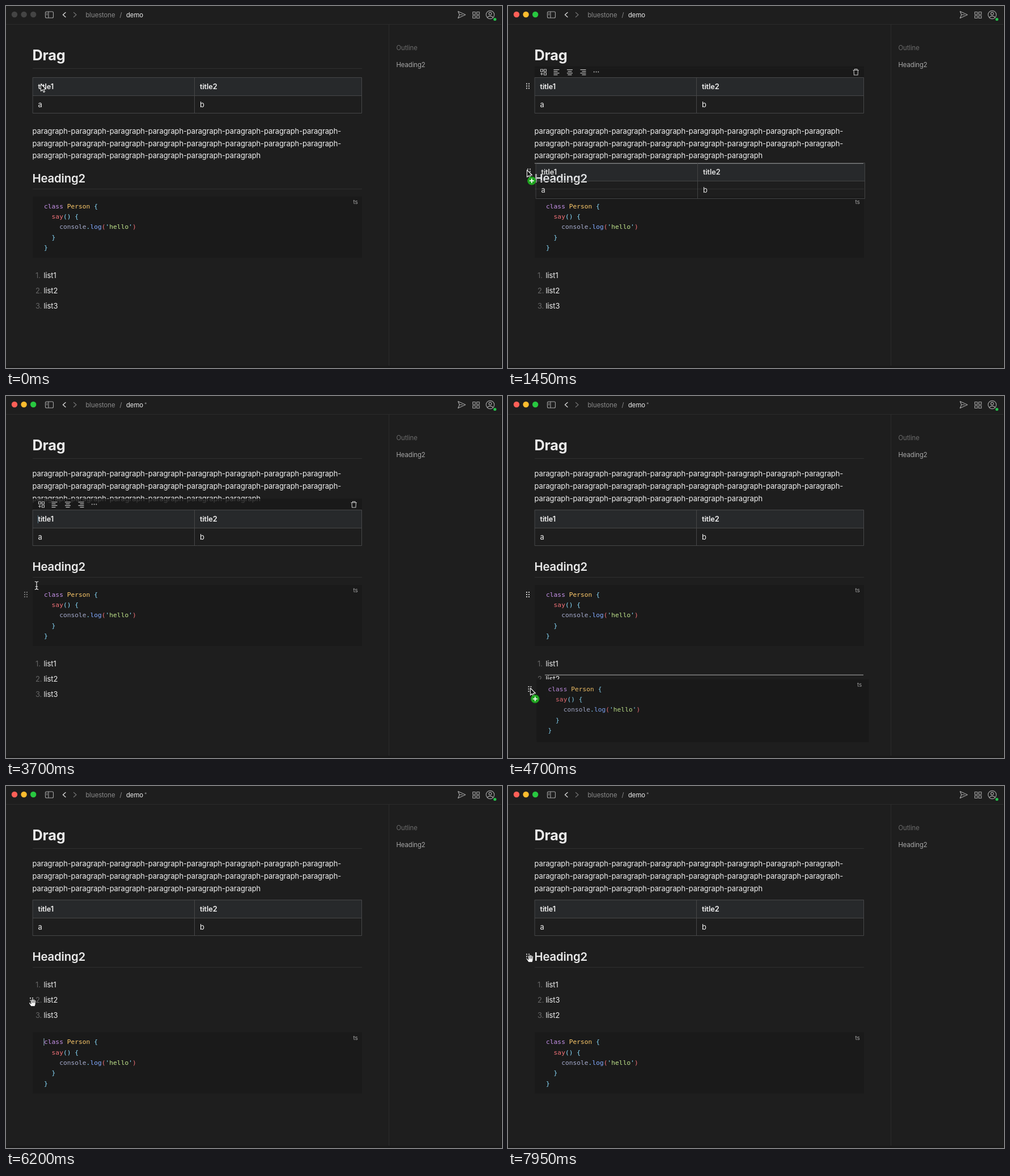
Write an HTML page with a canvas that moves like this. It is 875 px wide and 640 px high and loops after 8000 ms.

```html
<!DOCTYPE html>
<html lang="en">
<head>
<meta charset="utf-8">
<title>Drag demo</title>
<style>
html, body { margin: 0; width: 100%; height: 100%; overflow: hidden; background: #1e1e1e; }
canvas { display: block; width: 875px; height: 640px; }
</style>
</head>
<body>
<canvas id="stage"></canvas>
<script>
const W = 875, H = 640, LOOP = 8000;
const SANS = 'Inter, "Open Sans", sans-serif';
const MONO = '"DejaVu Sans Mono", monospace';
const INK = '#f0f0f0', EDGE = '#464748';
const LEFT = 47, RIGHT = 628;
const DROP1 = 2000, DROP2 = 5200, DROP3 = 6900;

const canvas = document.getElementById('stage');
const ctx = canvas.getContext('2d');
const dpr = window.devicePixelRatio || 1;
canvas.width = W * dpr;
canvas.height = H * dpr;

// time, x, y of the pointer
const track = [
  [0, 61.5, 138], [450, 61.5, 138], [900, 31.5, 139], [1050, 31.5, 139],
  [1450, 33.5, 290], [1980, 33.5, 290], [2250, 41, 183], [2600, 41, 183],
  [3300, 60, 262], [3700, 54, 335], [4100, 36, 349.5], [4300, 36, 349.5],
  [4700, 39.5, 516.5], [5050, 40, 546], [5350, 40, 546], [6100, 47, 383],
  [6250, 47, 383], [6750, 48, 411], [7050, 48, 411], [7800, 39, 305], [8000, 39, 305]
];

// start time, pointer shape
const shapes = [
  [0, 'arrow'], [800, 'hand'], [1050, 'drag'], [DROP1, 'arrow'], [2700, 'beam'],
  [3950, 'hand'], [4300, 'drag'], [DROP2, 'arrow'], [6000, 'hand'], [6250, 'drag'],
  [DROP3, 'arrow'], [7650, 'hand']
];

// from, to, x, y, colour
const handles = [
  [500, 800, 35, 141.5, '#777'], [800, DROP1, 35, 141.5, '#ccc'],
  [3600, 3950, 35, 351, '#777'], [3950, DROP2, 35, 351, '#ccc'],
  [6000, DROP3, 45, 379, '#ccc'], [7600, LOOP, 35, 301.5, '#ccc']
];

// from, to, left, y
const dropLines = [
  [1150, DROP1, LEFT, 278], [4450, 4600, LEFT, 446],
  [4600, 4850, 65, 493], [4850, DROP2, LEFT, 541], [6450, DROP3, 65, 418]
];

const during = (t, a, b) => t >= a && t < b;

function pointerAt(t) {
  let i = 1;
  while (i < track.length - 1 && t > track[i][0]) i++;
  const [t0, x0, y0] = track[i - 1], [t1, x1, y1] = track[i];
  const u = (t - t0) / (t1 - t0), e = u * u * (3 - 2 * u);
  return [x0 + (x1 - x0) * e, y0 + (y1 - y0) * e];
}

function text(str, x, y, size, color, weight = 400, family = SANS) {
  ctx.font = `${weight} ${size}px ${family}`;
  ctx.letterSpacing = family === SANS ? `${-0.01 * size}px` : '0px';
  ctx.fillStyle = color;
  ctx.fillText(str, x, y);
}

function rect(x, y, w, h, color) {
  ctx.fillStyle = color;
  ctx.fillRect(x, y, w, h);
}

function dot(x, y, r, color) {
  ctx.fillStyle = color;
  ctx.beginPath();
  ctx.arc(x, y, r, 0, 7);
  ctx.fill();
}

function stroke(d, color, width = 1.2) {
  ctx.strokeStyle = color;
  ctx.lineWidth = width;
  ctx.lineCap = ctx.lineJoin = 'round';
  ctx.stroke(new Path2D(d));
}

function at(x, y, fn) {
  ctx.save();
  ctx.translate(x, y);
  fn();
  ctx.restore();
}

function handle(x, y, color) {
  for (let i = 0; i < 6; i++)
    rect(x - 3 + (i % 2) * 4, y - 5 + (i >> 1) * 4, 2, 2, color);
}

function titleBar(t) {
  const lit = t >= 450;
  ['#ff5f57', '#febc2e', '#28c840'].forEach((c, i) =>
    dot(15 + i * 16.6, 15, 5.2, lit ? c : '#444444'));
  stroke('M71.5 10h10a2 2 0 0 1 2 2v7a2 2 0 0 1-2 2h-10a2 2 0 0 1-2-2v-7a2 2 0 0 1 2-2z M75 10v11 M71.5 13h1.5 M71.5 15.5h1.5', '#a5a5a5', 1.1);
  stroke('M105 11.5l-4.5 4 4.5 4', '#d8d8d8', 1.4);
  stroke('M119.5 11.5l4.5 4-4.5 4', '#707070', 1.3);
  text('bluestone', 140.5, 19.5, 11.4, '#8a8a8a');
  text('/', 200.5, 19.5, 11.4, '#8a8a8a');
  text('demo', 212, 19.5, 11.4, '#ececec');
  if (during(t, DROP1, 4900) || t >= DROP2) text('*', 244, 17.5, 9, '#909090');

  stroke('M797.5 9.5l13 6-13 6 2.5-6z M800 15.5h5', '#a0a0a0');
  for (let i = 0; i < 4; i++)
    ctx.strokeRect(823.5 + (i % 2) * 7, 10.5 + (i >> 1) * 6.5, 4.5, 4.5);
  stroke('M847 15.5a7.2 7.2 0 1 0 14.4 0a7.2 7.2 0 1 0-14.4 0 M851.8 13.5a2.4 2.4 0 1 0 4.8 0a2.4 2.4 0 1 0-4.8 0 M849.5 20.3c1.5-3.2 8-3.2 9.5 0', '#a0a0a0');
  dot(862.5, 23.5, 2.6, '#24c04c');
  rect(0, 32, W, 1, '#2b2b2b');
}

function sidePanel() {
  rect(675, 32, 1, 604, '#2b2b2b');
  text('Outline', 688.5, 78.3, 11.4, '#6c6c6c');
  text('Heading2', 688.5, 108.3, 11.4, '#a8a8a8');
  rect(874, 0, 1, H, '#151515');
  rect(0, 636, W, 4, '#191919');
}

function paragraph(y) {
  [8, 8, 6].forEach((n, i) => {
    const line = Array(n).fill('paragraph').join('-') + (i < 2 ? '-' : '');
    text(line, 46.5, y + i * 21.7, 13, INK);
  });
}

function heading(y) {
  text('Heading2', 46.5, y, 20.4, '#ebebeb', 600);
  rect(LEFT, y + 11.5, RIGHT - LEFT, 1, '#2f2f2f');
}

function table(y) {
  rect(LEFT, y, RIGHT - LEFT, 32, 'rgba(140,160,185,0.085)');
  ctx.strokeStyle = EDGE;
  ctx.lineWidth = 1;
  ctx.strokeRect(LEFT + 0.5, y + 0.5, RIGHT - LEFT - 1, 63);
  rect(332, y, 1, 63, EDGE);
  rect(LEFT, y + 32, RIGHT - LEFT, 1, EDGE);
  text('title1', 56.5, y + 21, 12.8, INK, 600);
  text('title2', 342, y + 21, 12.8, INK, 600);
  text('a', 56.5, y + 52.5, 13, INK);
  text('b', 342, y + 52.5, 13, INK);
}

function toolbar(y) {
  rect(LEFT, y, RIGHT - LEFT, 19.5, 'rgba(25,25,25,0.82)');
  at(0, y + 10, () => {
    const c = '#c4c4c4';
    stroke('M57.5-4.5h4v4h-4z M63.5-4.5h4v4h-4z M63.5 1.5h4v4h-4z M57.5 3.5h4 M59.5 1.5v4', c, 1.1);
    [[80.5, 0], [104, 0.5], [127.5, 1]].forEach(([x, align]) => {
      [10, 7, 10, 7].forEach((w, i) =>
        rect(x + (10 - w) * align, -4.5 + i * 3, w, 1.2, c));
    });
    for (let i = 0; i < 3; i++) dot(151.8 + i * 3.8, 0, 0.9, c);
    stroke('M609-3h9.5 M611.5-3v-2h4.5v2 M610-3l.5 8.5h6.5l.5-8.5', c, 1.1);
  });
}

const C = { key: '#c792ea', type: '#ffcb6b', op: '#89ddff', fn: '#f07178', id: '#a6accd', call: '#82aaff', str: '#c3e88d' };
const codeLines = [
  [['class ', C.key], ['Person ', C.type], ['{', C.op]],
  [['  say', C.fn], ['() {', C.op]],
  [['    console', C.id], ['.', C.op], ['log', C.call], ['(', C.fn], ["'", C.op], ['hello', C.str], ["'", C.op], [')', C.fn]],
  [['  }', C.op]],
  [['}', C.op]]
];

function code(y) {
  rect(LEFT, y, RIGHT - LEFT, 108, '#1a1a1a');
  codeLines.forEach((line, i) => {
    let x = 67;
    for (const [str, color] of line) {
      text(str, x, y + 20.8 + i * 18.3, 11.28, color, 400, MONO);
      x += ctx.measureText(str).width;
    }
  });
  text('ts', 612.5, y + 13.3, 10, '#a8a8a8');
}

function list(y, items) {
  items.forEach((n, i) => {
    text(i + 1 + '.', 52, y + i * 26.7, 13, '#666666');
    text('list' + n, 66.5, y + i * 26.7, 13, INK);
  });
}

function ghost(t, [px, py]) {
  const grab = (gx, gy, hx, hy, draw) => at(px - gx, py - gy, () => {
    ctx.globalAlpha = 0.92;
    draw();
    handle(hx, hy, '#ccc');
  });
  if (during(t, 1050, DROP1)) grab(31.5, 139, 35, 141.5, () => table(126));
  if (during(t, 4300, DROP2)) grab(36, 349.5, 35, 351, () => {
    rect(LEFT, 334, RIGHT + 5 - LEFT, 111, '#1a1a1a');
    code(334);
  });
  if (during(t, 6250, DROP3)) grab(47, 383, 45, 379, () => text('list2', 66.5, 383, 13, INK));
}

function arrow() {
  const p = new Path2D('M0 0V12.5L2.9 9.8L5 14.5L7 13.6L5 9H9Z');
  ctx.fillStyle = '#111';
  ctx.fill(p);
  ctx.strokeStyle = '#f0f0f0';
  ctx.lineWidth = 1.1;
  ctx.lineJoin = 'round';
  ctx.stroke(p);
}

function badge() {
  dot(8.3, 19, 7.6, '#1fa31f');
  rect(4.3, 18.2, 8, 1.7, '#fff');
  rect(7.45, 15, 1.7, 8, '#fff');
}

function hand() {
  const p = new Path2D('M-3 6.5L-6 2C-7 0-5-1-4 .5L-3 2L-4-4C-4-6-2-6-1.7-4.5L-1-6C-.5-7.5 1.2-7 1.2-5.5C2-6.5 3.5-6 3.6-4.5C4.5-5 5.8-4 5.7-2.5L5 3.5L4 6.5Z');
  ctx.fillStyle = '#f4f4f4';
  ctx.fill(p);
  ctx.strokeStyle = '#111';
  ctx.lineWidth = 1;
  ctx.stroke(p);
  stroke('M-1.5-4L-.8 0 M1.2-5V0 M3.5-4L3.2 0', '#222', 0.8);
}

function beam() {
  const d = 'M-3-7C-1-7 0-6.5 0-5V5C0 6.5-1 7-3 7 M3-7C1-7 0-6.5 0-5 M0 5C0 6.5 1 7 3 7 M-2 2H2';
  stroke(d, '#111', 2.8);
  stroke(d, '#f0f0f0', 1.2);
}

function pointer(t, [x, y]) {
  const kind = shapes.filter(s => s[0] <= t).pop()[1];
  at(x, y, () => {
    if (kind === 'hand') hand();
    else if (kind === 'beam') beam();
    else {
      arrow();
      if (kind === 'drag') badge();
    }
  });
}

function draw(t) {
  ctx.setTransform(dpr, 0, 0, dpr, 0, 0);
  rect(0, 0, W, H, '#1e1e1e');
  titleBar(t);
  sidePanel();

  const moved = t >= DROP1, swapped = t >= DROP2;
  const tableY = moved ? 201 : 126, shift = moved ? -3 : 0;
  text('Drag', 46.5, 95.5, 25.4, '#ebebeb', 700);
  rect(LEFT, 110, RIGHT - LEFT, 1, '#2f2f2f');
  paragraph(moved ? 142.3 : 226);
  table(tableY);
  heading(311.5 + shift);
  code(swapped ? 435.5 : 337 + shift);
  list(swapped ? 356.3 : 481.3 + shift, t >= DROP3 ? [1, 3, 2] : [1, 2, 3]);

  if (during(t, 900, 4300)) toolbar(tableY - 19.5);
  if (during(t, DROP1, 4300)) rect(56, 211, 1, 14, '#5f7f92');
  if (during(t, DROP2, 6250)) rect(66.5, 446, 1, 13, '#8fb0c4');

  for (const [a, b, x, y, c] of handles) if (during(t, a, b)) handle(x, y, c);
  for (const [a, b, x, y] of dropLines)
    if (during(t, a, b)) rect(x, y - 0.5, RIGHT - 1 - x, 1.5, '#808080');

  const p = pointerAt(t);
  ghost(t, p);
  pointer(t, p);
}

const start = performance.now();
function tick() {
  draw((performance.now() - start) % LOOP);
  requestAnimationFrame(tick);
}
tick();
</script>
</body>
</html>
```
